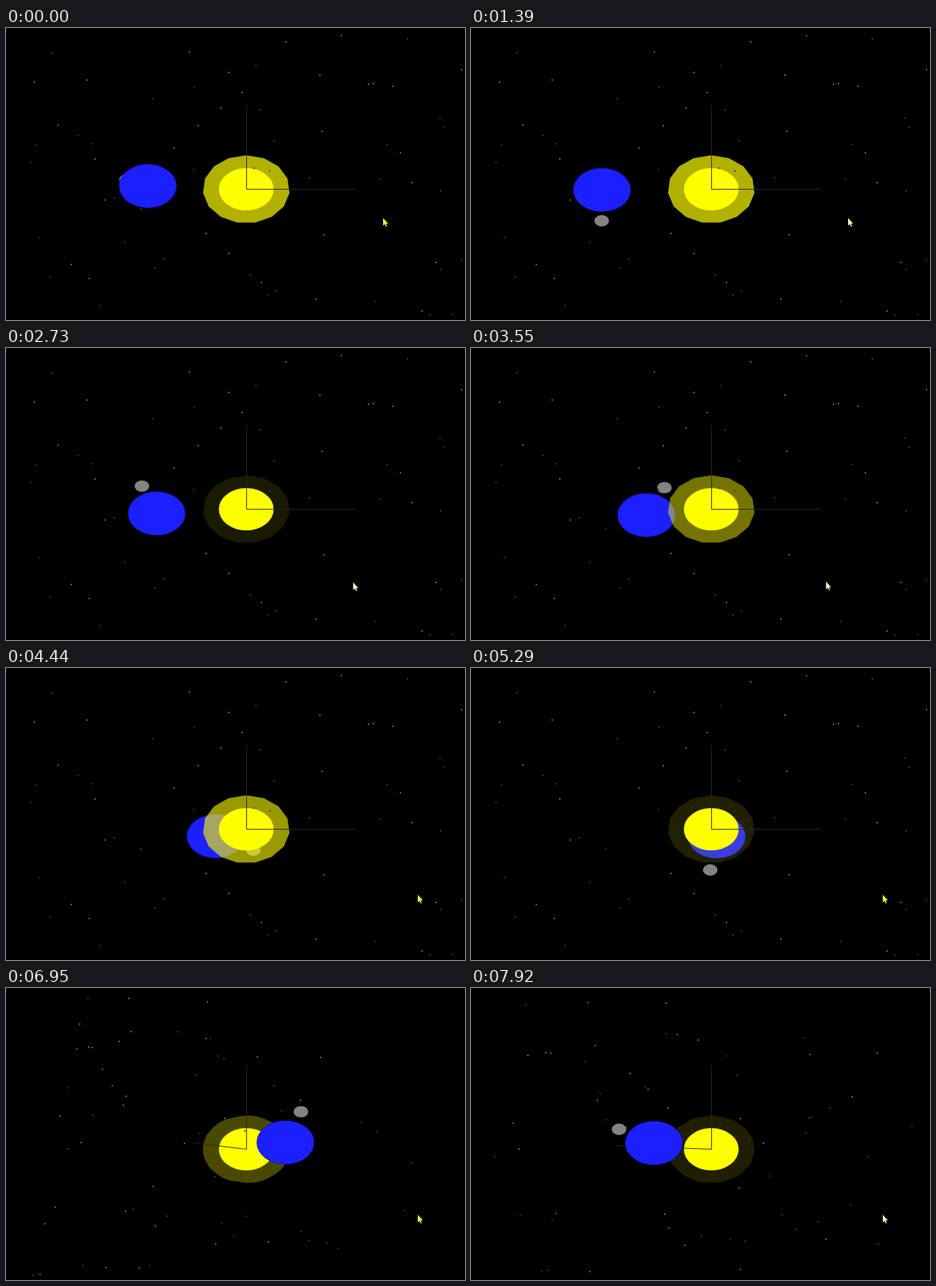
These frames come from a looping animation (661 px wide and 421 px high, 7.99 s). An HTML page with a canvas:

```html
<!DOCTYPE html>
<html lang="en">
<head>
<meta charset="utf-8">
<title>Orbit</title>
<style>
html, body { margin: 0; width: 100%; height: 100%; overflow: hidden; background: #000; }
canvas { display: block; }
</style>
</head>
<body>
<canvas id="stage" width="661" height="421"></canvas>
<script>
const ctx = document.getElementById('stage').getContext('2d');
const LOOP = 7990, CX = 346, CY = 232.5;
const TILT = 0.0665, ASPECT = 1.29;
const ORBIT = 158, MOON_ORBIT = 63;
const rad = deg => deg * Math.PI / 180;

// Screen x, screen y and depth of the brighter stars before the view turns
const brightStars = [
  [483, 11, 118], [403, 20, 32], [264, 35, 235], [321, 64, 80], [452, 68, 150],
  [656, 60, 103], [41, 78, 46], [117, 75, 108], [522, 81, 157], [529, 80, 158],
  [557, 84, 162], [340, 93, 240], [310, 115, 240], [75, 140, 60], [277, 141, 240],
  [455, 149, 138], [568, 180, 184], [128, 189, 222], [242, 173, 93], [585, 223, 140],
  [143, 248, 265], [288, 296, 230], [321, 325, 163], [458, 298, 252], [94, 341, 102],
  [120, 361, 300], [368, 367, 38], [446, 391, 176], [599, 408, 200], [619, 338, 181]
];

// Fainter stars fill out the field
let seed = 11;
const random = () => (seed = seed * 16807 % 2147483647) / 2147483647;
const faintStars = Array.from({ length: 36 }, () =>
  [36 + random() * 620, 15 + random() * 400, random() * 500 - 200]);

// Straight lines between the given [time, value] pairs
function track(keys, t) {
  const next = keys.findIndex(key => key[0] > t);
  if (next === 0) return keys[0][1];
  if (next < 0) return keys[keys.length - 1][1];
  const [t0, a] = keys[next - 1], [t1, b] = keys[next];
  return a + (b - a) * (t - t0) / (t1 - t0);
}

const cameraAngle = t =>
  track([[5874, 0], [6050, 19.4], [6950, 118.8], [7920, 149.5]], t);

const glow = t => track([[0, .7], [700, .1], [1390, .7], [2730, .1], [4100, .7],
  [4440, .61], [5250, .1], [6050, .7], [6950, .29], [7450, .1], [7920, .12]], t);

// y runs down the screen, z runs towards the viewer
function project(x, y, z, turn) {
  const c = Math.cos(turn), s = Math.sin(turn);
  const depth = x * s + z * c;
  return { x: CX + x * c - z * s, y: CY + y - TILT * depth, depth };
}

function ellipse(p, rx, ry, fill) {
  ctx.beginPath();
  ctx.ellipse(p.x, p.y, rx, ry, 0, 0, 2 * Math.PI);
  ctx.fillStyle = fill;
  ctx.fill();
}

function line(a, b) {
  ctx.beginPath();
  ctx.moveTo(a.x, a.y);
  ctx.lineTo(b.x, b.y);
  ctx.strokeStyle = '#272722';
  ctx.lineWidth = 1;
  ctx.stroke();
}

// Outline of a coarse sphere: the farthest vertex in every direction
function drawCorona(turn, alpha) {
  const points = [];
  for (let stack = 0; stack <= 15; stack++) {
    const ring = Math.sin(rad(12 * stack)), z = Math.cos(rad(12 * stack));
    for (let slice = 0; slice < 15; slice++) {
      const a = rad(24 * slice);
      points.push(project(62.8 * ring * Math.sin(a), -48.8 * ring * Math.cos(a), 62.8 * z, turn));
    }
  }
  ctx.beginPath();
  for (let deg = 0; deg < 360; deg += 3) {
    const ux = Math.cos(rad(deg)), uy = Math.sin(rad(deg));
    const far = points.reduce((m, p) => p.x * ux + p.y * uy > m.x * ux + m.y * uy ? p : m);
    ctx.lineTo(far.x, far.y);
  }
  ctx.closePath();
  ctx.fillStyle = `rgba(255,252,0,${alpha})`;
  ctx.fill();
}

function drawSun(turn, alpha) {
  drawCorona(turn, alpha);
  ellipse({ x: CX, y: CY }, 39.5, 30.5, '#ffff00');
  const origin = { x: CX + .5, y: CY };
  line(origin, { x: CX + .5, y: 112 });
  line(origin, project(ORBIT, 0, 0, turn));
}

function drawEarth(p) {
  ellipse(p, 41.7, 31.8, '#1014b8');
  ellipse(p, 40.6, 30.8, '#1c20ff');
}

function drawStars(list, turn, color) {
  ctx.fillStyle = color;
  for (const [x, y, z] of list) {
    const p = project(x - CX, y - CY + TILT * z, z, turn);
    if (p.x >= 31) ctx.fillRect(Math.round(p.x) - 1, Math.round(p.y) - 1, 2, 2);
  }
}

const arrow = new Path2D('M0 0V11L2.5 8.8 4.2 12.5 5.8 11.8 4.2 8.2 7.3 8Z');

function drawCursor(t) {
  const x = track([[1800, 543], [2500, 500], [3450, 500], [4250, 589], [4400, 593]], t);
  const y = track([[1800, 274], [2500, 338], [3450, 338], [4400, 327]], t);
  const pale = (t > 1000 && t < 3800) || t > 7500;
  ctx.save();
  ctx.translate(x, y);
  ctx.fillStyle = pale ? '#f3efb4' : '#f8f020';
  ctx.fill(arrow);
  ctx.restore();
}

function draw(t) {
  const turn = rad(cameraAngle(t));
  const orbit = rad(153.8 + 0.0225 * t);
  const spin = rad(-15 + 0.0895 * t);
  const plane = orbit - rad(274);
  const ex = ORBIT * Math.cos(orbit), ez = ORBIT * Math.sin(orbit);
  const reach = MOON_ORBIT * Math.cos(spin);
  const earth = project(ex, 0, ez, turn);
  const moon = project(ex + reach * Math.cos(plane), MOON_ORBIT / ASPECT * Math.sin(spin),
    ez + reach * Math.sin(plane), turn);

  ctx.fillStyle = '#000';
  ctx.fillRect(0, 0, 661, 421);
  const bodies = [
    { depth: 0, paint: () => drawSun(turn, glow(t)) },
    { depth: earth.depth, paint: () => drawEarth(earth) },
    { depth: moon.depth, paint: () => ellipse(moon, 10.5, 8.2, '#838383') }
  ];
  bodies.sort((a, b) => a.depth - b.depth).forEach(body => body.paint());
  drawStars(faintStars, turn, '#383838');
  drawStars(brightStars, turn, '#686868');
  drawCursor(t);
}

const start = performance.now();
function tick() {
  draw((performance.now() - start) % LOOP);
  requestAnimationFrame(tick);
}
tick();
</script>
</body>
</html>
```
